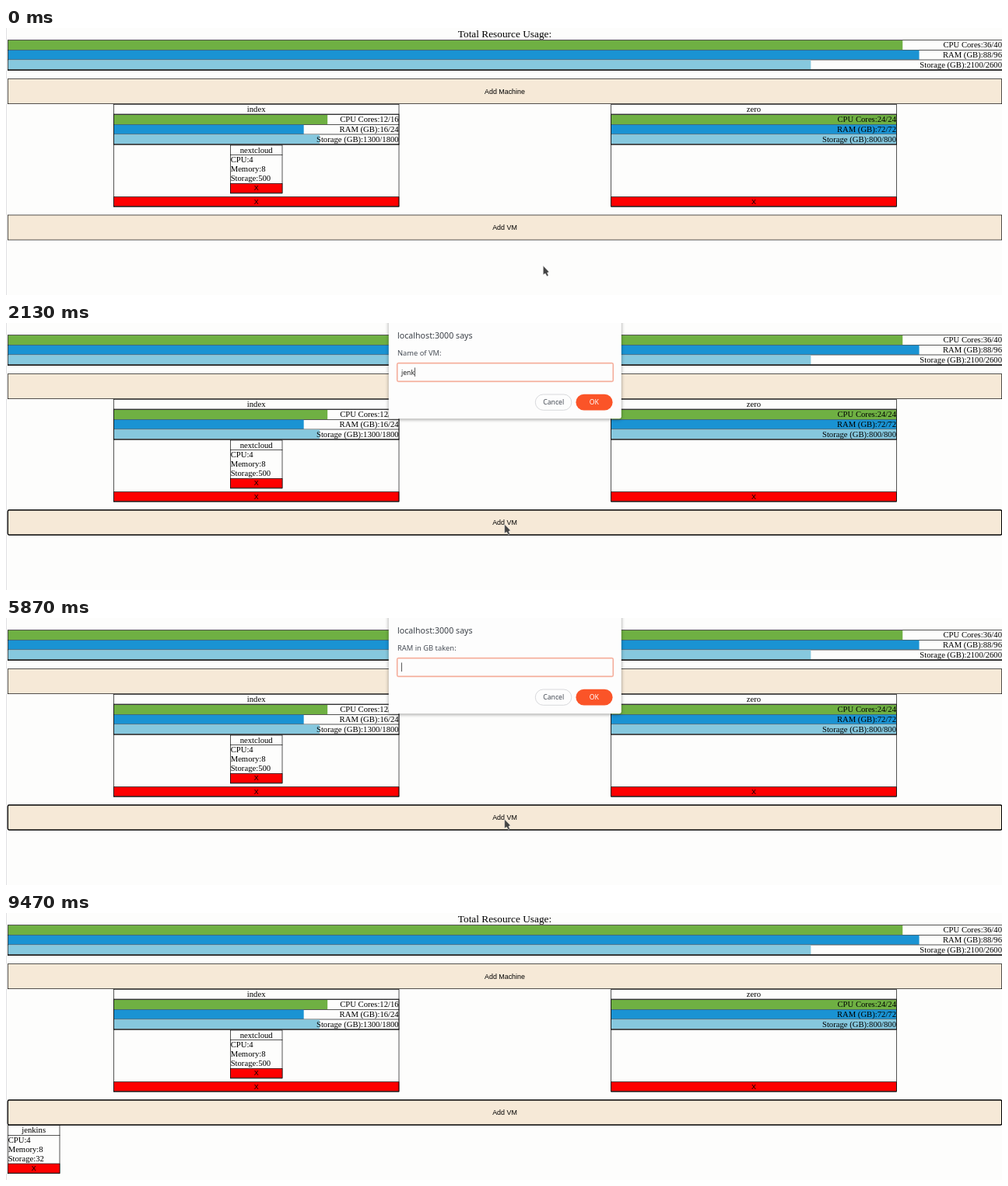
An HTML page for the animation above (9.54 s loop, 1280 by 344 pixels).

```html
<!DOCTYPE html>
<html lang="en">
<head>
<meta charset="utf-8">
<title>Resource usage</title>
<style>
  html, body { margin: 0; width: 100%; height: 100%; overflow: hidden; background: #fdfdfc; }
  svg { display: block; width: 100vw; height: 100vh; }
  text { font: 16px "Liberation Serif", "Times New Roman", serif; fill: #000; white-space: pre; }
  .title { font-size: 20px; }
  .btn { font: 13.333px "Liberation Sans", Arial, sans-serif; }
  .says, .label, .small { font-family: "Noto Sans", "Open Sans", sans-serif; }
  .says { font-size: 10.667px; fill: #3c4148; }
  .label { font-size: 9.333px; fill: #484e57; }
  .small { font-size: 8.667px; fill: #444a54; }
  .value { fill: #222; }
  .pill { font-weight: 500; }
  .ok { fill: #fff; }
  .panel { filter: drop-shadow(0 1px 2px rgba(0, 0, 0, .4)); }
</style>
</head>
<body>
<svg id="stage" viewBox="0 0 1280 344" preserveAspectRatio="none"></svg>
<script>
const LOOP = 9540;
const PAPER = '#fdfdfc', INK = '#000', RED = '#fe0000', CREAM = '#f6e9d7';
const BARS = ['#6fb043', '#1a93d3', '#86c8de'];
const FADE_IN = 300, FADE_OUT = 200, BLUR_LEAD = 110, BLINK = 600;
const CLICK = 850, ADDED = 8300;
const stage = document.getElementById('stage');

const prompts = [
  { label: 'Name of VM:', text: 'jenkins', open: 893, close: 2970, keys: [1650, 1780, 1910, 2040, 2170, 2300, 2430] },
  { label: 'CPU cores taken:', text: '4', open: 2983, close: 5070, keys: [4740] },
  { label: 'RAM in GB taken:', text: '8', open: 5085, close: 6372, keys: [5950] },
  { label: 'Storage in GB taken:', text: '32', open: 6387, close: 8300, keys: [7150, 7330] }
];

function add(parent, tag, attrs, content) {
  const el = document.createElementNS('http://www.w3.org/2000/svg', tag);
  for (const key in attrs) el.setAttribute(key, attrs[key]);
  if (content) el.textContent = content;
  parent.appendChild(el);
  return el;
}

const rect = (parent, x, y, width, height, fill, more) =>
  add(parent, 'rect', { x, y, width, height, fill, ...more });
const text = (parent, x, y, str, cls = '', anchor = 'start') =>
  add(parent, 'text', { x, y, class: cls, 'text-anchor': anchor }, str);
const show = (el, on) => el.setAttribute('visibility', on ? 'visible' : 'hidden');
const clamp = v => Math.max(0, Math.min(1, v));
const smooth = v => v * v * (3 - 2 * v);

// A box whose border lies inside its edges, as in CSS.
const box = (parent, x, y, w, h, fill = 'none') =>
  rect(parent, x + .5, y + .5, w - 1, h - 1, fill, { stroke: INK });

// The page is laid out 1920 units wide and shown at two thirds.
const page = add(stage, 'g', { transform: 'scale(.66667)' });

function usage(x, y, w, rows) {
  rows.forEach(([name, used, total], i) => {
    const top = y + 1 + 19 * i;
    rect(page, x + 1, top, (w - 2) * used / total, 18, BARS[i]);
    rect(page, x, top + 18, w, 1, INK);
    text(page, x + w - 1, top + 14, `${name}:${used}/${total}`, '', 'end');
  });
  box(page, x, y, w, 59);
}

const resources = (cpu, ram, disk) =>
  [['CPU Cores', ...cpu], ['RAM (GB)', ...ram], ['Storage (GB)', ...disk]];

function removeButton(parent, x, y, w) {
  box(parent, x, y, w, 19, RED);
  text(parent, x + w / 2, y + 14, 'X', 'btn', 'middle');
}

function machine(x, name, rows) {
  const w = 551;
  text(page, x + w / 2, 162, name, '', 'middle');
  rect(page, x, 166, w, 1, INK);
  usage(x, 167, w, rows);
  removeButton(page, x, 326, w);
  box(page, x, 147, w, 199);
}

function vm(x, y, name, cpu, memory, storage) {
  const g = add(page, 'g', { transform: `translate(${x} ${y})` });
  const w = 101;
  box(g, 0, 0, w, 94, PAPER);
  text(g, w / 2, 15, name, '', 'middle');
  rect(g, 0, 19, w, 1, INK);
  [`CPU:${cpu}`, `Memory:${memory}`, `Storage:${storage}`]
    .forEach((s, i) => text(g, 1, 34 + 18 * i, s));
  removeButton(g, 0, 74, w);
  return g;
}

function wideButton(y, label) {
  const b = box(page, 3, y, 1917, 49, CREAM);
  text(page, 961.5, y + 29, label, 'btn', 'middle');
  return b;
}

function dialog(p) {
  const g = add(stage, 'g', {});
  rect(g, 491.8, -60, 299, 183.3, '#fdfdfd', { rx: 3, class: 'panel' });
  text(g, 503, 20.3, 'localhost:3000 says', 'says');
  text(g, 503, 42, p.label, 'label');
  const glow = rect(g, 502.5, 51.5, 278, 24, 'none', { rx: 2, stroke: '#f9c4b6', 'stroke-width': 1.3 });
  const field = rect(g, 503, 52, 277, 23, '#fdfdfd', { rx: 1.5, 'stroke-width': .8 });
  const value = text(g, 508, 66.8, '', 'small value');
  const caret = rect(g, 508, 57.5, .8, 11.5, '#333');
  rect(g, 680.3, 92, 46.5, 20.3, '#fdfdfd', { rx: 10.1, stroke: '#cfd0d4', 'stroke-width': .8 });
  text(g, 703.7, 105.3, 'Cancel', 'small pill', 'middle');
  rect(g, 732.4, 91.7, 47.2, 20.9, '#fb5428', { rx: 10.4 });
  text(g, 755.8, 105.3, 'OK', 'small pill ok', 'middle');
  return { ...p, g, glow, field, value, caret };
}

rect(page, 0, 0, 1920, 516, PAPER);
rect(page, 0, 0, 1, 516, '#d2d2d6');
text(page, 961.5, 18, 'Total Resource Usage:', 'title', 'middle');
usage(3, 23, 1918, resources([36, 40], [88, 96], [2100, 2600]));
rect(page, 3, 81, 1917, 1, INK);
wideButton(98, 'Add Machine');
machine(207, 'index', resources([12, 16], [16, 24], [1300, 1800]));
machine(1166, 'zero', resources([24, 24], [72, 72], [800, 800]));
vm(432, 226, 'nextcloud', 4, 8, 500);
const addVm = wideButton(361, 'Add VM');
const newVm = vm(3, 410, 'jenkins', 4, 8, 32);
const dialogs = prompts.map(dialog);
const cursor = add(stage, 'path', {
  d: 'M0 0V11.5L2.8 10 5 13.6 6.8 12.5 5.2 9.2 7.6 8Z',
  fill: '#444', stroke: '#eee', 'stroke-width': .5
});

function drawDialog(d, t) {
  const { open, close, keys } = d;
  const alive = t >= open && t < close + FADE_OUT;
  d.g.setAttribute('display', alive ? 'inline' : 'none');
  if (!alive) return;

  const p = clamp((t - open) / FADE_IN), q = clamp((t - close) / FADE_OUT);
  const lift = 12 * (1 - p) ** 2 + 14 * q;
  const scale = 1 + .00145 * lift;
  d.g.setAttribute('opacity', Math.min(1, 2.6 * p) * (1 - q));
  d.g.setAttribute('transform',
    `translate(641.5 ${123.5 - lift}) scale(${scale}) translate(-641.5 -123.5)`);

  const typed = keys.filter(k => k <= t).length;
  d.value.textContent = d.text.slice(0, typed);
  const focused = t < close - BLUR_LEAD;
  show(d.glow, focused);
  d.field.setAttribute('stroke', focused ? '#ef9078' : '#d6d7da');

  // The blink restarts on focus and on every key.
  const since = t - (typed ? keys[typed - 1] : open + 290);
  show(d.caret, focused && (since < 0 || since % (2 * BLINK) < BLINK));
  d.caret.setAttribute('x', 508 + (typed ? d.value.getComputedTextLength() : 0));
}

function drawCursor(t) {
  const arrive = smooth(clamp((t - 100) / 650));
  const leave = smooth(clamp((t - 8800) / 600));
  const x = 690.3 - 49.6 * arrive + 540 * leave;
  const y = 306.3 - 47 * arrive - 279 * leave;
  cursor.setAttribute('transform', `translate(${x} ${y})`);
}

function render(t) {
  const focus = t >= CLICK;
  addVm.setAttribute('stroke-width', focus ? 2 : 1);
  addVm.setAttribute('rx', focus ? 2.5 : 0);
  show(newVm, t >= ADDED);
  dialogs.forEach(d => drawDialog(d, t));
  drawCursor(t);
}

const start = performance.now();
function tick() {
  render((performance.now() - start) % LOOP);
  requestAnimationFrame(tick);
}
tick();
</script>
</body>
</html>
```
